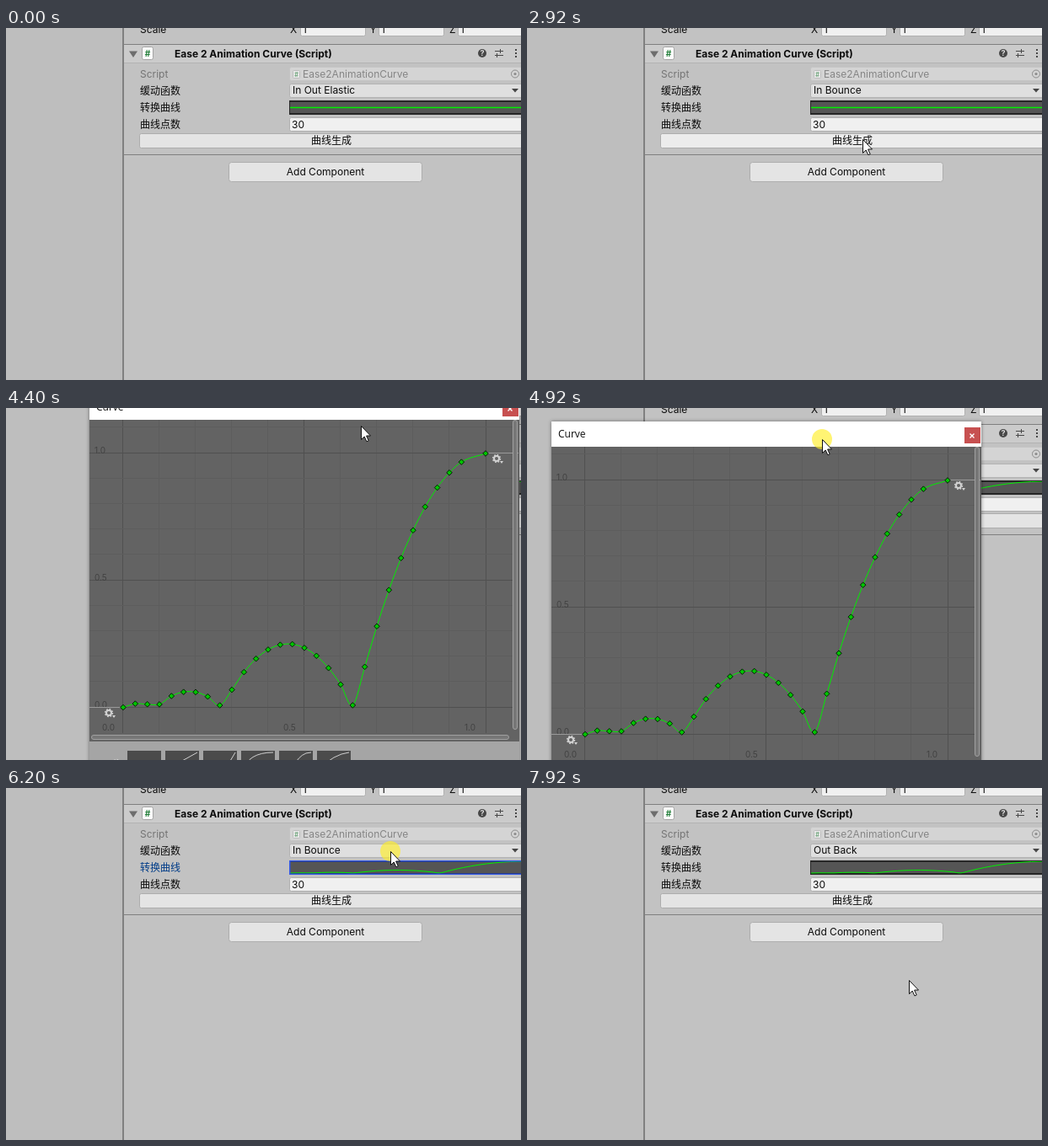
An HTML page that plays this animation: 611x418 px, repeating every 8000 ms.

```html
<!DOCTYPE html>
<html lang="zh-CN">
<head>
<meta charset="utf-8">
<style>
  html, body { margin: 0; width: 100%; height: 100%; overflow: hidden; background: #c2c2c2; }
  svg { display: block; width: 611px; height: 418px; font: 12px Inter, "Noto Sans CJK SC", "Noto Sans CJK", sans-serif; fill: #0c0c0c; }
  .input { fill: #f0f0f0; stroke: #b0b0b0; }
  .button { fill: #e4e4e4; stroke: #adadad; }
  .axis { font-size: 10px; fill: #424242; }
  .green { fill: none; stroke: #00f000; vector-effect: non-scaling-stroke; }
  #window { filter: drop-shadow(0 0 2px rgba(0, 0, 0, .45)); }
</style>
</head>
<body>
<svg viewBox="0 0 611 418">
  <defs>
    <clipPath id="stripClip"><rect x="337" y="87" width="274" height="15"/></clipPath>
    <clipPath id="listClip"><rect x="336" y="107" width="158" height="311"/></clipPath>
    <g id="gear">
      <circle r="3" fill="none" stroke="#d2d2d2" stroke-width="2"/>
      <circle r="4.4" fill="none" stroke="#d2d2d2" stroke-width="1.6" stroke-dasharray="1.7 1.756"/>
      <path d="M4 3h4l-2 3z" fill="#d2d2d2"/>
    </g>
  </defs>

  <rect width="611" height="418" fill="#c2c2c2"/>
  <rect width="138" height="418" fill="#bebebe"/>
  <rect x="138" width="2" height="418" fill="#808080"/>

  <text x="159" y="6">Scale</text>
  <g id="axes"></g>

  <rect x="140" y="19" width="471" height="22" fill="#cbcbcb"/>
  <path d="M140 19.5H611M140 150.5H611" stroke="#7f7f7f"/>
  <path d="M140 41.5H611" stroke="#b2b2b2"/>
  <path d="M146 27.5h10l-5 7.5z" fill="#6d6d6d"/>
  <rect x="161.500" y="22.500" width="13" height="15" rx="2" fill="#fafafa" stroke="#a5a5a5"/>
  <text x="168" y="34" font-size="10" font-weight="700" text-anchor="middle" fill="#25803c">#</text>
  <text x="200" y="35" font-weight="700">Ease 2 Animation Curve (Script)</text>
  <circle cx="565" cy="30" r="5" fill="#474747"/>
  <text x="565" y="33.200" font-size="9" font-weight="700" text-anchor="middle" fill="#e0e0e0">?</text>
  <path d="M580 27.500h10M580 32.500h10M586.500 25v5M582.500 30v5" stroke="#474747" fill="none"/>
  <path d="M604 25h2v2h-2zM604 29h2v2h-2zM604 33h2v2h-2z" fill="#474747"/>

  <text x="159" y="59" fill="#747474">Script</text>
  <rect x="336.500" y="46.500" width="290" height="16" rx="2" fill="#d4d4d4" stroke="#c4c4c4"/>
  <rect x="340.500" y="50.500" width="8" height="9" rx="1" fill="#e8e8e8" stroke="#bdbdbd"/>
  <text x="344.500" y="58" font-size="7" font-weight="700" text-anchor="middle" fill="#72a87f">#</text>
  <text x="352" y="59" fill="#858585">Ease2AnimationCurve</text>
  <circle cx="604" cy="54.500" r="4.500" fill="none" stroke="#8b8b8b"/>
  <circle cx="604" cy="54.500" r="1.600" fill="#8b8b8b"/>

  <text x="159" y="79">缓动函数</text>
  <rect x="336.500" y="66.500" width="290" height="16" rx="2" fill="#dfdfdf" stroke="#b3b3b3"/>
  <text id="easeName" x="340" y="78"></text>
  <path d="M600 72h8l-4 4.500z" fill="#454545"/>

  <text id="curveLabel" x="159" y="99">转换曲线</text>
  <rect x="336" y="86" width="290" height="17" fill="#262626"/>
  <rect x="337" y="88" width="290" height="13" fill="#555"/>
  <path id="flatLine" class="green" d="M337 94.500H611" stroke-width="1.500"/>
  <g id="stripCurve" clip-path="url(#stripClip)"><path class="green curve" transform="translate(337 101) scale(280 -14)"/></g>
  <rect id="stripFocus" x="336.750" y="86.750" width="290" height="15.500" fill="none" stroke="#3157e6" stroke-width="1.500"/>

  <text x="159" y="119">曲线点数</text>
  <rect class="input" x="336.500" y="106.500" width="290" height="16" rx="2"/>
  <text x="339" y="119">30</text>
  <rect id="generate" class="button" x="158.500" y="125.500" width="455" height="17" rx="2"/>
  <text x="386" y="138" text-anchor="middle">曲线生成</text>
  <rect class="button" x="264.500" y="159.500" width="229" height="23" rx="3"/>
  <text x="379" y="175" text-anchor="middle">Add Component</text>

  <g id="popup">
    <rect x="335.500" y="84.500" width="159" height="340" fill="#dfdfdf" stroke="#565656"/>
    <rect x="336" y="85" width="158" height="21" fill="#c9c9c9"/>
    <path d="M336 106.500H494" stroke="#8c8c8c"/>
    <rect x="342.500" y="89.500" width="130" height="15" rx="4" fill="#f0f0f0" stroke="#2a66b0" stroke-width="1.500"/>
    <path d="M351.500 98.500l2.500 2.500" stroke="#666"/>
    <circle cx="349.500" cy="96.500" r="2.200" fill="none" stroke="#666"/>
    <path d="M357.500 91v12" stroke="#111"/>
    <text x="359" y="101" font-size="10" fill="#8a8a8a">Search</text>
    <path d="M476.500 94.500l5 5m0-5l-5 5" stroke="#858585" stroke-width="1.300"/>
    <g clip-path="url(#listClip)">
      <g id="list"></g>
      <rect x="482" y="107" width="12" height="311" fill="#cecece"/>
      <path d="M482.500 107V418" stroke="#bcbcbc"/>
      <path d="M485 117h8l-4-4.500z" fill="#555"/>
      <rect id="thumb" x="483.500" width="10.500" height="270" rx="4" fill="#989898"/>
    </g>
  </g>

  <g id="window">
    <rect x="19" y="16" width="510" height="520" fill="#a5a5a5"/>
    <rect x="19" y="16" width="510" height="30" fill="#fff"/>
    <text x="27" y="35" font-family="Open Sans, sans-serif">Curve</text>
    <rect x="509" y="23" width="19" height="19" fill="#c75050"/>
    <path d="M515.500 30.500l5 5m0-5l-5 5" stroke="#fff" stroke-width="1.400"/>
    <rect x="19" y="46" width="510" height="382" fill="#636363"/>
    <g id="grid" fill="none"></g>
    <path d="M19 387.500H59M489 85.500H528" stroke="#9a9a9a"/>
    <path class="green curve" transform="translate(59 387.500) scale(430 -301.500)"/>
    <g id="keys" fill="#00c400" stroke="#041c04"></g>
    <use href="#gear" x="42" y="394"/>
    <use href="#gear" x="502" y="92"/>
    <g fill="#777" stroke="#a0a0a0">
      <rect x="521.500" y="46.500" width="5" height="367" rx="2.500"/>
      <rect x="21.500" y="420.500" width="495" height="5" rx="2.500"/>
    </g>
    <g id="presets"></g>
  </g>

  <circle id="click" r="12" fill="#ffee28" fill-opacity=".65"/>
  <path id="cursor" d="M.5.500V16.500L4.200 13 6.900 18.800 9.200 17.800 6.600 12H11.500Z" fill="#fff" stroke="#111"/>
</svg>
<script>
const $ = id => document.getElementById(id);
const show = (id, on) => $(id).style.display = on ? '' : 'none';
const repeat = (n, make) => Array.from({ length: n }, (_, i) => make(i)).join('');

// Bounce curve: keys at i/30 with the last one moved to 1, joined by averaged tangents
function bounceOut(t) {
  const [shift, base] = t < 1 / 2.75 ? [0, 0] : t < 2 / 2.75 ? [1.5, .75] : t < 2.5 / 2.75 ? [2.25, .9375] : [2.625, .984375];
  t -= shift / 2.75;
  return 7.5625 * t * t + base;
}
const keys = Array.from({ length: 30 }, (_, i) => {
  const t = i < 29 ? i / 30 : 1;
  return [t, 1 - bounceOut(1 - t)];
});
const slope = i => (keys[i + 1][1] - keys[i][1]) / (keys[i + 1][0] - keys[i][0]);
const tangent = i => i === 0 ? slope(0) : i === 29 ? slope(28) : (slope(i - 1) + slope(i)) / 2;
const curvePath = 'M0 0' + repeat(29, i => {
  const [x0, y0] = keys[i], [x1, y1] = keys[i + 1], h = (x1 - x0) / 3;
  return `C${x0 + h} ${y0 + h * tangent(i)} ${x1 - h} ${y1 - h * tangent(i + 1)} ${x1} ${y1}`;
});
document.querySelectorAll('.curve').forEach(path => path.setAttribute('d', curvePath));
$('keys').innerHTML = keys.map(([x, y]) =>
  `<path d="M${59 + 430 * x} ${384.2 - 301.5 * y}l3.300 3.300-3.300 3.300-3.300-3.300z"/>`).join('');

$('grid').innerHTML =
  repeat(11, i => `<path d="M${Math.floor(58 + 43.1 * i) + .5} 46V418" stroke="${i % 5 ? '#5d5d5d' : '#505050'}"/>`) +
  repeat(12, i => `<path d="M19 ${Math.floor(387 - 30.2 * i) + .5}H521" stroke="${i % 5 ? '#5d5d5d' : '#505050'}"/>`) +
  repeat(3, i => {
    const label = (i / 2).toFixed(1);
    return `<text class="axis" x="25" y="${387.5 - 151 * i}">${label}</text>
      <text class="axis" x="${34 + 215 * i}" y="415">${label}</text>`;
  });

const presetShapes = ['M2 22H38', 'M2 22L38 2', 'M2 24Q30 22 38 2', 'M2 24Q8 2 38 2', 'M2 24C20 24 20 2 38 2', 'M2 22Q20 4 38 2'];
$('presets').innerHTML = presetShapes.map((d, i) => `<g transform="translate(${64 + 45 * i} 439)">
  <rect width="40" height="25" fill="#4b4b4b"/><path d="${d}" fill="none" stroke="#d0d0d0"/></g>`).join('') +
  '<use href="#gear" x="51" y="454"/>';

$('axes').innerHTML = ['X', 'Y', 'Z'].map((name, i) => `<text x="${337 + 94.5 * i}" y="6">${name}</text>
  <rect class="input" x="${[349, 442, 536][i] + .5}" y="-7.500" width="77" height="17" rx="2"/>
  <text x="${[352, 445, 539][i]}" y="6">1</text>`).join('');

const families = ['Sine', 'Quad', 'Cubic', 'Quart', 'Quint', 'Expo', 'Circ', 'Elastic', 'Back', 'Bounce'];
const eases = ['Linear', ...families.flatMap(name => ['In', 'Out', 'In Out'].map(side => `${side} ${name}`))];
$('list').innerHTML = eases.map((name, i) => `<g transform="translate(0 ${22 * (i - 5)})">
  <path d="M348 111.500H469" stroke="#b4b4b4"/><path d="M348 112.500H469" stroke="#f2f2f2"/>
  <text x="352" y="128">${name}</text></g>`).join('');

// Keyframes: [time, x, y]
const cursorRuns = [
  [280, 1520, [[280, 543, 382], [900, 384, 72], [1440, 384, 72], [1480, 384, 158]]],
  [2320, 6720, [
    [2320, 425, 400], [2840, 398, 132], [3200, 398, 132], [3320, 408, 103], [4080, 408, 103],
    [4400, 421, 21], [4480, 420, 5], [4920, 350, 37], [5040, 340, 37], [5500, 522, 35], [5640, 522, 35],
    [5800, 478, 66], [6120, 456, 75], [6280, 456, 75], [6680, 450, 412]]],
  [7920, 8000, [[7920, 453, 228]]],
];
const windowMove = [[4480, 80, -32], [4920, 10, 0], [5040, 0, 0]];
const presses = [[920, 1040], [3000, 3080], [3600, 3720], [4480, 5040], [5560, 5680], [6160, 6280]];

function along(frames, t) {
  const next = frames.findIndex(frame => frame[0] > t);
  if (next < 1) return frames.at(next).slice(1);
  const [t0, x0, y0] = frames[next - 1], [t1, x1, y1] = frames[next];
  let k = (t - t0) / (t1 - t0);
  k = k * k * (3 - 2 * k);
  return [x0 + (x1 - x0) * k, y0 + (y1 - y0) * k].map(Math.round);
}
const move = (id, [x, y]) => $(id).setAttribute('transform', `translate(${x} ${y})`);

function draw(now) {
  const t = Math.floor(now % 8000 / 40) * 40;
  const within = (from, to) => t >= from && t < to;

  $('easeName').textContent = t < 2240 ? 'In Out Elastic' : t < 7640 ? 'In Bounce' : 'Out Back';
  show('flatLine', t < 3080);
  show('stripCurve', t >= 3080);
  const focused = within(3600, 3720) || within(5680, 6280);
  show('stripFocus', focused);
  $('curveLabel').style.fill = focused ? '#003c88' : '';
  $('generate').style.fill = within(2840, 3080) ? '#ececec' : '';

  show('popup', within(1120, 2200) || within(6320, 7640));
  const scroll = t < 4000 ? 0 : 88;
  move('list', [0, -scroll]);
  $('thumb').setAttribute('y', 204 + scroll * .59);

  show('window', within(3720, 5680));
  move('window', along(windowMove, t));

  const run = cursorRuns.find(([from, to]) => within(from, to));
  show('cursor', run);
  show('click', run && presses.some(([from, to]) => within(from, to)));
  if (run) {
    const point = along(run[2], t);
    move('cursor', point);
    move('click', point);
  }
  requestAnimationFrame(() => draw(performance.now() - start));
}
const start = performance.now();
draw(0);
</script>
</body>
</html>
```
